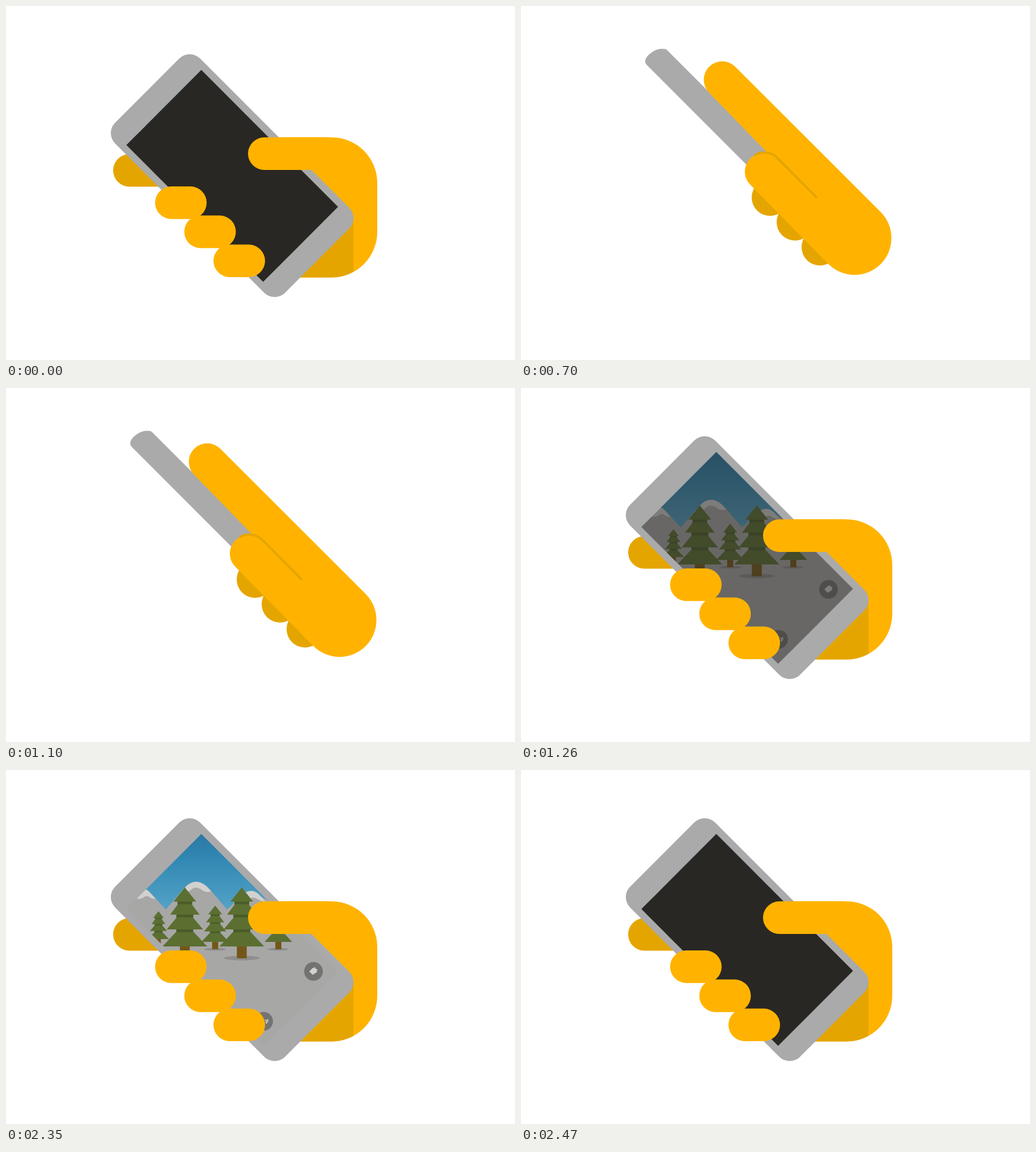
These frames come from a looping animation (898x624 px, 2.5 s). An HTML page:

```html
<!DOCTYPE html>
<html lang="en">
<head>
<meta charset="utf-8">
<title>Twist to open camera</title>
<style>
  html, body { margin: 0; width: 100%; height: 100%; overflow: hidden; background: #fff; }
  svg { display: block; width: 100%; height: 100%; }
  .skin { fill: #ffb300; }
  .shade { fill: #e5a500; }
  .case { fill: #aaa; }
  .ground { fill: #bdbdbd; }
  .snow { fill: #eee; }
  .shadow { fill: #a0a0a0; }
</style>
</head>
<body>
<svg viewBox="0 0 898 624">
  <defs>
    <linearGradient id="sky" gradientUnits="userSpaceOnUse" x1="0" y1="113" x2="0" y2="246">
      <stop offset="0" stop-color="#2c87ba"/>
      <stop offset=".33" stop-color="#3399cc"/>
      <stop offset="1" stop-color="#5cb8e2"/>
    </linearGradient>
    <rect id="panel" x="-170.6" y="-93.5" width="341.2" height="187" transform="translate(399.1 299.6) rotate(45)"/>
    <clipPath id="screen"><use href="#panel"/></clipPath>
    <rect id="finger" width="91" height="57.5" rx="28.75"/>
    <g id="tree">
      <path fill="#806018" d="M-8.7 102H8.7V125H-8.7Z"/>
      <path fill="#50662a" d="M-13 24H13V50H-13ZM-15 47H15V82H-15Z"/>
      <path fill="#647c34" d="M0 0L20 25H-20ZM-12 29.5H12L26 48H-26ZM-14 52.5H14L32 74H-32ZM-16 79H16L39.5 104H-39.5Z"/>
    </g>
  </defs>

  <g id="front">
    <rect class="shade" x="189" y="261" width="141" height="57.5" rx="28.75"/>
    <path class="skin" d="M470 231.5H574.5A80.5 80.5 0 0 1 655 312V398A80.5 80.5 0 0 1 574.5 478.5H470Z"/>
    <path class="shade" d="M613 370V468.7A80.5 80.5 0 0 1 574.5 478.5H480Z"/>
    <rect class="case" x="-212" y="-106" width="424" height="212" rx="26" transform="translate(399 299) rotate(45)"/>

    <g clip-path="url(#screen)">
      <path fill="url(#sky)" d="M200 100H600V260H200Z"/>
      <path class="ground" d="M200 256L238 215Q246 206 255 217L282 246L311 212Q335 182 361 212L390 246L418 219Q434 206 450 223L480 240H600V500H200Z"/>
      <path class="snow" d="M231 227L240 214Q246 207 253 215L264 227Q257 228 252 223Q246 221 242 225Q237 228 231 227Z"/>
      <path class="snow" d="M310 214Q335 180 362 214Q352 217 345 211Q334 204 328 210Q319 218 310 214Z"/>
      <path class="snow" d="M418 219Q434 206 448 221L458 232Q447 231 441 226Q433 223 428 229L420 232Z"/>
      <ellipse class="shadow" cx="369" cy="316" rx="19" ry="2.5"/>
      <ellipse class="shadow" cx="480" cy="316" rx="18.5" ry="2.5"/>
      <ellipse class="shadow" cx="416" cy="331.5" rx="31.5" ry="4"/>
      <use href="#tree" transform="translate(269 249) scale(.47)"/>
      <use href="#tree" transform="translate(369 239) scale(.615)"/>
      <use href="#tree" transform="translate(480.5 239) scale(.615)"/>
      <use href="#tree" transform="translate(315.5 207)"/>
      <use href="#tree" transform="translate(416 207)"/>
      <g fill="#808080">
        <circle cx="542.5" cy="355" r="16.5"/>
        <circle cx="454.5" cy="443" r="16.5"/>
      </g>
      <path class="snow" d="M535 355L541 349H543L545 347L546 350L550 352L548 354L549 356L541 361Z"/>
      <path fill="none" stroke="#eee" stroke-width="1.3" d="M457 440L460 443L458 446M459 442L462 440V443L459 447"/>
    </g>
    <use id="dark" href="#panel" fill="#292723"/>

    <path class="skin" d="M455.75 231.5H570V289H455.75A28.75 28.75 0 0 1 455.75 231.5Z"/>
    <g class="skin">
      <use href="#finger" x="263" y="318"/>
      <use href="#finger" x="314.5" y="369.2"/>
      <use href="#finger" x="366" y="420.5"/>
    </g>
  </g>

  <g id="thumbSide">
    <path class="case" d="M222 104Q218 100 219.500 95C222 86 237 75 249 75.500Q255 75 258 78L445 265L410 292Z"/>
    <g class="shade">
      <circle cx="439.5" cy="337.5" r="32.5"/>
      <circle cx="483.5" cy="381" r="32.5"/>
      <circle cx="527.5" cy="425" r="32.5"/>
    </g>
    <path class="skin" d="M332 153A32.5 32.5 0 0 1 378 107L634.5 363A65 65 0 0 1 542.5 455L404.5 315A32.5 32.5 0 0 1 437 260.900Z"/>
    <path fill="none" stroke="#e5a500" stroke-width="4" d="M412 263.500A32.5 32.5 0 0 1 451 266.500L522 338"/>
  </g>

  <g id="fingerSide">
    <rect class="shade" x="500" y="150" width="110" height="57.5" rx="28.75"/>
    <rect class="case" x="-212" y="-22" width="424" height="44" rx="12" transform="translate(569 265) rotate(45)"/>
    <path class="skin" d="M379 200A32.5 32.5 0 0 1 425 154L634.5 363A65 65 0 0 1 542.5 455L379 292A65 65 0 0 1 379 200Z"/>
    <g class="skin">
      <rect x="440" y="186" width="126" height="57.5" rx="28.75"/>
      <rect x="491" y="237.2" width="126" height="57.5" rx="28.75"/>
      <rect x="543" y="288.500" width="126" height="57.5" rx="28.75"/>
    </g>
  </g>
</svg>
<script>
  const LOOP = 2500, TWIST_START = 500, TWIST_END = 1200, TWIST_STEP = 100;
  const WAKE = 1200, SLEEP = 2350, FADE_STEP = 30, FADE_STEPS = 5;
  const part = id => document.getElementById(id);
  const poses = ["front", "thumbSide", "fingerSide"];

  function poseAt(t) {
    if (t < TWIST_START || t >= TWIST_END) return "front";
    return Math.floor((t - TWIST_START) / TWIST_STEP) % 2 ? "fingerSide" : "thumbSide";
  }

  // The screen dims in even steps from 14% to fully dark, and wakes in reverse.
  const dim = step => step < 0 ? 0 : Math.min(1, 0.14 + 0.215 * step);

  function darknessAt(t) {
    if (t < WAKE) return 1;
    if (t < SLEEP) return dim(FADE_STEPS - 1 - Math.floor((t - WAKE) / FADE_STEP));
    return dim(Math.floor((t - SLEEP) / FADE_STEP));
  }

  function draw(now) {
    const t = now % LOOP, current = poseAt(t);
    for (const id of poses) part(id).style.display = id === current ? "" : "none";
    part("dark").style.opacity = darknessAt(t);
  }

  const start = performance.now();
  function tick() {
    draw(performance.now() - start);
    requestAnimationFrame(tick);
  }
  tick();
</script>
</body>
</html>
```
